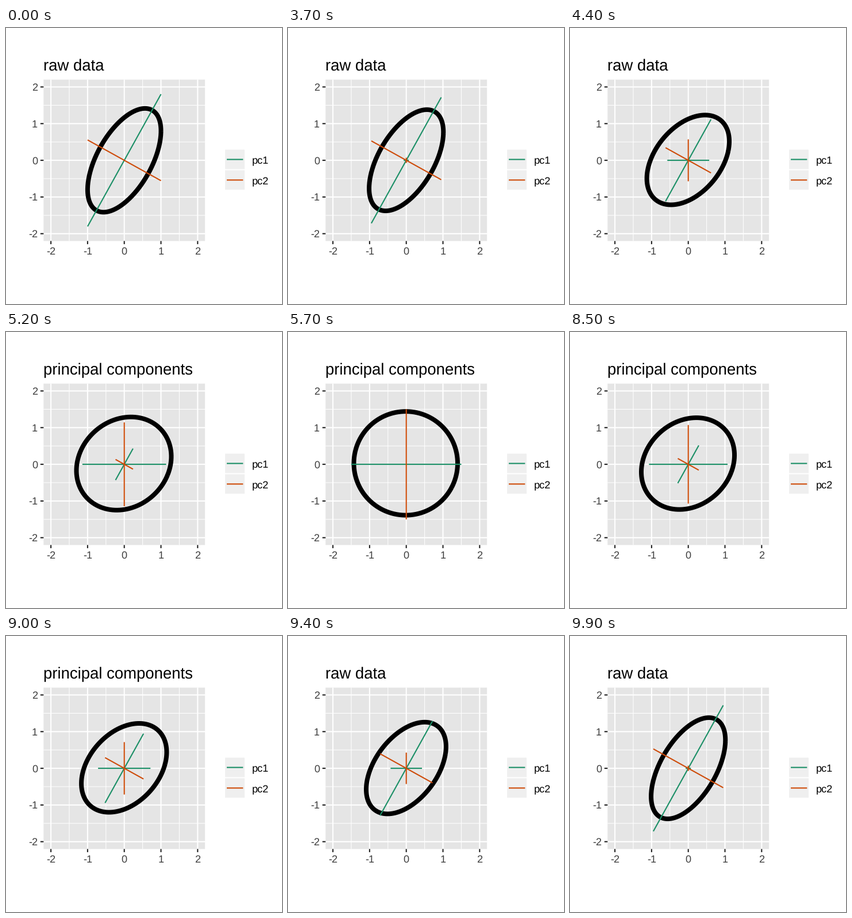
Animation, 480 px wide and 480 px high, one loop 10000 ms. Source, as a matplotlib script:

```python
import numpy as np
import matplotlib.pyplot as plt
from matplotlib.animation import FuncAnimation
from matplotlib.patches import Rectangle

plt.rcParams.update({
    "font.family": "Liberation Sans",
    "text.hinting": "none",
    "path.snap": False,
    "lines.solid_capstyle": "butt",
})

SIZE, DPI = 480, 72            # at 72 dpi one point is one pixel
FRAMES, INTERVAL = 100, 100
CX, CY, UNIT = 205.7, 230.1, 63.8
LIM = 2.2
GREEN, ORANGE = "#1b8f66", "#ce4b08"
PANEL, KEY, LABEL, TICK = "#e5e5e5", "#efefef", "#3d3d3d", "#242424"
LINE = 2.1

fig = plt.figure(figsize=(SIZE / DPI, SIZE / DPI), dpi=DPI, facecolor="white")
ax = fig.add_axes([0, 0, 1, 1])
ax.set(xlim=(0, SIZE), ylim=(SIZE, 0))
ax.axis("off")


def px(x):
    return CX + UNIT * np.asarray(x)


def py(y):
    return CY - UNIT * np.asarray(y)


def stroke(x, y, color, width=LINE, z=2):
    return ax.plot(x, y, color=color, lw=width, zorder=z)[0]


def box(x, y, w, h, color):
    ax.add_patch(Rectangle((x, y), w, h, fc=color, lw=0, zorder=0))


def label(x, y, s, size=18.1, color="black", ha="left"):
    return ax.text(x, y, s, size=size, color=color, ha=ha, va="baseline")


# Panel, grid and axes
left, right = px(-LIM), px(LIM)
top, bottom = py(LIM), py(-LIM)
box(left, top, right - left, bottom - top, PANEL)


def grid(v, width):
    stroke([left, right], [py(v)] * 2, "white", width, 1)
    stroke([px(v)] * 2, [top, bottom], "white", width, 1)


for v in np.arange(-1.5, 2):
    grid(v, LINE / 2)
for v in range(-2, 3):
    grid(v, LINE)
    stroke([left - 5.5, left], [py(v)] * 2, TICK)
    stroke([px(v)] * 2, [bottom, bottom + 5.5], TICK)
    label(left - 10.3, py(v) + 6.4, str(v), color=LABEL, ha="right")
    label(px(v), 394, str(v), color=LABEL, ha="center")

# Legend
for name, color, y in (("pc1", GREEN, 211.6), ("pc2", ORANGE, 247.4)):
    box(381, y, 34, 33.8, KEY)
    stroke([384, 412.3], [y + 17] * 2, color)
    label(427.5, y + 24.6, name)

title = label(left - 0.3, 74, "", size=27.5)

# Raw ellipse: sd ratio sqrt(2), covariance B; the scaled scores form a circle
B = 0.8
R = np.sqrt(2)
t = np.linspace(0, 2 * np.pi, 361)
half = np.arccos(B / R) / 2
raw = np.array([np.cos(t), R * np.cos(t - 2 * half)])
scores = np.array([R * np.cos(t - half) - 0.015, R * np.sin(half - t) * -1 + 0.027])

ring = stroke([], [], "black", 8, 3)
ring.set_solid_joinstyle("round")

# Each segment: half-extent in x and y, and whether it belongs to the scores
SLOPE, REACH = 1.802, 1.5
segments = [
    (stroke([], [], color, z=4), dx, dy, scored)
    for color, dx, dy, scored in (
        (GREEN, 1, SLOPE, False),
        (GREEN, REACH, 0, True),
        (ORANGE, 1, -1 / SLOPE, False),
        (ORANGE, 0, REACH, True),
    )
]


def draw(i):
    p = np.interp(i, [36, 57, 79, 100], [0, 1, 1, 0])
    x, y = (1 - p) * raw + p * scores
    ring.set_data(px(x), py(y))
    for line, dx, dy, scored in segments:
        k = p if scored else 1 - p
        line.set_data(px([-k * dx, k * dx]), py([-k * dy, k * dy]))
        line.set_visible(k > 1e-6)
    title.set_text("principal components" if 48 <= i <= 90 else "raw data")
    return [ring, title] + [s[0] for s in segments]


anim = FuncAnimation(fig, draw, frames=FRAMES, interval=INTERVAL,
                     repeat=True, repeat_delay=0, cache_frame_data=False)
plt.show()
```
